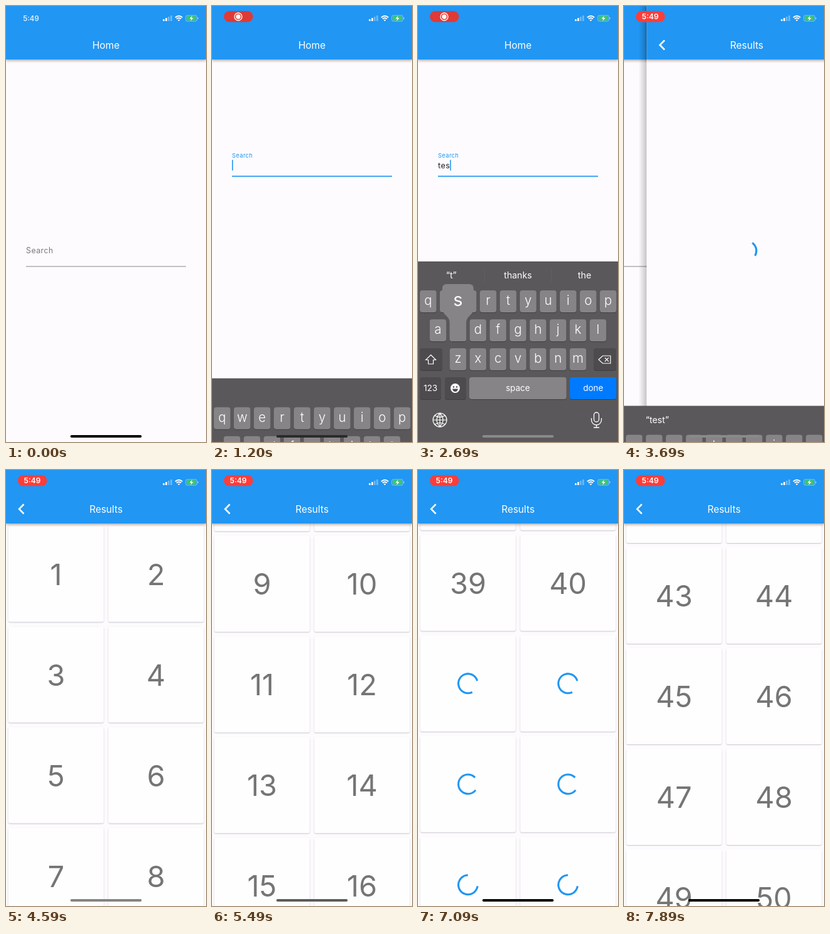
An HTML page with a canvas for the animation above (7990 ms loop, 320x693 px).

```html
<!DOCTYPE html>
<html lang="en">
<head>
<meta charset="utf-8">
<title>Search and results</title>
<style>
html, body { margin: 0; height: 100%; overflow: hidden; background: #fdfbfe; }
canvas { display: block; width: 320px; height: 693px; }
</style>
</head>
<body>
<canvas id="stage"></canvas>
<script>
const W = 320, H = 693, BAR = 85, LOOP = 7990;
const BLUE = '#2196f3', PAGE = '#fdfbfe', KEY = '#868486', DARK_KEY = '#4d4b4d';
const canvas = document.getElementById('stage'), c = canvas.getContext('2d');
const dpr = window.devicePixelRatio || 1;
canvas.width = W * dpr;
canvas.height = H * dpr;

// Timeline in ms
const PILL = 590, FOCUS = 980, KEYBOARD_UP = 1122, PUSH = 3557, KEYBOARD_DOWN = 3526;
const LOADED = 4555, SWIPE_1 = 4990, SWIPE_2 = 5790;
const presses = [['t', 1880], ['e', 2180], ['s', 2580], ['t', 2880]];

const clamp = v => Math.max(0, Math.min(1, v));
const mix = (a, b, u) => a + (b - a) * u;

function bezier(x1, y1, x2, y2) {
  const at = (s, a, b) => 3 * (1 - s) ** 2 * s * a + 3 * (1 - s) * s * s * b + s ** 3;
  return x => {
    if (x <= 0 || x >= 1) return clamp(x);
    let lo = 0, hi = 1;
    for (let i = 0; i < 24; i++) {
      const mid = (lo + hi) / 2;
      if (at(mid, x1, x2) < x) lo = mid; else hi = mid;
    }
    return at(lo, y1, y2);
  };
}
const fastOutSlowIn = bezier(.4, 0, .2, 1);
const pageCurve = bezier(.35, .91, .33, .97);

// Critically damped spring, as used by the keyboard
function spring(ms) {
  const x = Math.max(0, ms) * .01826;
  return 1 - (1 + x) * Math.exp(-x);
}

// Accelerating drag followed by a fling with friction
function swipe(ms, duration, distance) {
  if (ms < 0) return 0;
  if (ms < duration) return distance * (ms / duration) ** 1.8;
  return distance + 900 * distance / duration * (1 - Math.exp(-(ms - duration) / 500));
}
const PAUSE = 742, DRAG = 565, DRAG_PX = 1025.6;
const scrollAt = t => t < SWIPE_2
  ? Math.min(PAUSE, swipe(t - SWIPE_1, 200, 206))
  : PAUSE + swipe(t - SWIPE_2, DRAG, DRAG_PX);

// Time at which a row comes within 250px of the viewport: inverse of the second swipe
function builtAt(row) {
  const x = BAR + 160 * row - H - 250 - PAUSE;
  if (x < DRAG_PX) return SWIPE_2 + DRAG * (x / DRAG_PX) ** (1 / 1.8);
  return SWIPE_2 + DRAG - 500 * Math.log(1 - (x - DRAG_PX) / (900 * DRAG_PX / DRAG));
}
const pageReadyAt = row => row < 10 ? 0 : builtAt(row < 20 ? 10 : 20) + 1000;

function rect(x, y, w, h, r, color) {
  c.fillStyle = color;
  c.beginPath();
  c.roundRect(x, y, w, h, r);
  c.fill();
}

function text(str, x, y, size, { color = '#fff', weight = 400, align = 'center', spacing = 0 } = {}) {
  c.font = `${weight} ${size}px Inter, "Liberation Sans", sans-serif`;
  c.letterSpacing = spacing + 'px';
  c.textAlign = align;
  c.fillStyle = color;
  c.fillText(str, x, y + size * .36);
}

function stroke(path, width, color = '#fff') {
  c.strokeStyle = color;
  c.lineWidth = width;
  c.stroke(new Path2D(path));
}

function disc(x, y, r, color = '#fff') {
  c.fillStyle = color;
  c.beginPath();
  c.arc(x, y, r, 0, 7);
  c.fill();
}

function shadow(color, blur, dy) {
  c.shadowColor = color;
  c.shadowBlur = blur * dpr;
  c.shadowOffsetY = dy * dpr;
}

function layer(x, y, draw) {
  c.save();
  c.translate(x, y);
  draw();
  c.restore();
}

function appBar(title) {
  layer(0, 0, () => {
    shadow('rgba(0,0,0,.32)', 4, 1.5);
    rect(0, 0, W, BAR, 0, BLUE);
  });
  text(title, W / 2, 62, 15.5);
}

function spinner(x, y, ms) {
  const turn = ms / 1000, step = Math.floor(turn) % 5, u = turn % 1;
  const head = fastOutSlowIn(u * 2), tail = fastOutSlowIn(u * 2 - 1);
  const start = Math.PI * (-.5 + 1.5 * tail + 1.7 * u - .8 * step);
  c.strokeStyle = BLUE;
  c.lineWidth = 3.1;
  c.lineCap = 'square';
  c.beginPath();
  c.arc(x, y, 15.4, start, start + Math.max(.001, 1.5 * Math.PI * (head - tail)));
  c.stroke();
  c.lineCap = 'butt';
}

function homePage(t) {
  rect(0, 0, W, H, 0, PAGE);
  appBar('Home');
  const focused = t >= FOCUS && t < KEYBOARD_DOWN;
  const raised = t >= KEYBOARD_UP && t < KEYBOARD_DOWN;
  const float = fastOutSlowIn((t - FOCUS) / 190);
  const typed = presses.filter(p => t >= p[1]);
  const value = typed.map(p => p[0]).join('');
  const accent = focused ? BLUE : '#7a787b';
  layer(32, raised ? -143.5 : 0, () => {
    text('Search', 0, mix(389, 381, float), mix(12.4, 9.4, float),
      { color: accent, align: 'left', spacing: mix(.45, .35, float) });
    text(value, 0, 396.5, 12.6, { color: '#222', align: 'left', spacing: .4 });
    const caret = value ? c.measureText(value).width : 0;
    rect(0, focused ? 413.3 : 413.5, 256, focused ? 1.6 : .9, 0, focused ? BLUE : '#88868a');
    const lastEdit = typed.length ? typed[typed.length - 1][1] : FOCUS;
    if (focused && (t - lastEdit) % 1000 < 500) rect(caret, 388, 1.6, 17, .5, BLUE);
  });
}

function resultsPage(t) {
  rect(0, 0, W, H, 0, PAGE);
  if (t < LOADED) spinner(W / 2, 389, t - PUSH);
  else {
    const scroll = scrollAt(t);
    const first = Math.floor(scroll / 160);
    for (let row = first; row < first + 5; row++) {
      const y = BAR + 80 + row * 160 - scroll;
      for (let col = 0; col < 2; col++) {
        const x = 80 + col * 160;
        layer(0, 0, () => {
          shadow('rgba(60,50,70,.27)', 1.6, 1);
          rect(x - 76.5, y - 76.5, 153, 153, 3, '#fefefe');
        });
        if (t < pageReadyAt(row)) spinner(x, y, t - builtAt(row));
        else text(row * 2 + col + 1, x, y + .6, 47, { color: '#757575' });
      }
    }
  }
  appBar('Results');
  stroke('M28.5 54.5L21 62l7.5 7.5', 2.6);
}

const keyRows = [['qwertyuiop', 3, 452], ['asdfghjkl', 18.7, 498], ['zxcvbnm', 50.7, 544]];

function key(x, y, w, label, size, color = KEY, weight = 400) {
  rect(x, y + 1, w, 35, 4, '#403e40');
  rect(x, y, w, 35, 4, color);
  if (label) text(label, x + w / 2, y + 17.5 - (size > 16 ? 1.5 : 0), size, { weight });
}

function popup(letter) {
  const [row, x0, y] = keyRows.find(r => r[0].includes(letter));
  layer(x0 + row.indexOf(letter) * 32 + 13.2, y, () => {
    c.fillStyle = KEY;
    c.fill(new Path2D('M-18-56H18Q25-56 25-49V-18Q25-11 19-6Q13.2-1 13.2 6V31Q13.2 35 9 35H-9' +
      'Q-13.2 35-13.2 31V6Q-13.2-1-19-6Q-25-11-25-18V-49Q-25-56-18-56Z'));
    text(letter, 0, -31.5, 29);
  });
}

function suggestions(t) {
  if (t >= 2980) return ['“test”'];
  return t >= 1980 ? ['“t”', 'thanks', 'the'] : [];
}

function keyboard(t) {
  rect(0, 406, W, 287, 0, '#5a585a');
  const words = suggestions(t);
  words.forEach((word, i) => text(word, 53.3 + i * 106.6, 428, 14.2));
  if (words.length > 1) [106, 213].forEach(x => rect(x, 416, .7, 24, 0, '#646264'));

  for (const [letters, x, y] of keyRows)
    [...letters].forEach((ch, i) => key(x + i * 32, y, 26.5, ch, 20.5, KEY, 300));
  key(3, 544, 36, '', 0, DARK_KEY);
  key(281, 544, 36, '', 0, DARK_KEY);
  key(3, 590, 34, '123', 13.5, DARK_KEY);
  key(43, 590, 34, '', 0, DARK_KEY);
  key(82, 590, 155.5, 'space', 13.5);
  key(243, 590, 74.5, 'done', 13.5, '#007aff');

  stroke('M20.5 554.5L28.5 562.5H24.5V569H16.5V562.5H12.5Z', 1.2);
  stroke('M289 562L295.5 556H308V568H295.5ZM299 559l6 6m0-6l-6 6', 1.2);
  disc(59.5, 607.5, 7.5);
  disc(57, 605.5, 1.2, DARK_KEY);
  disc(62, 605.5, 1.2, DARK_KEY);
  c.fillStyle = DARK_KEY;
  c.fill(new Path2D('M55 608.5H64Q63 613 59.5 613T55 608.5'));

  stroke('M24 658a11 11 0 1 0 22 0a11 11 0 1 0-22 0H46M35 647V669M35 647q-10 11 0 22q10-11 0-22' +
    'M27 651q8 5 16 0M27 665q8-5 16 0', 1.2);
  stroke('M281.5 650a4 4 0 0 1 8 0v7a4 4 0 0 1-8 0ZM277.5 655v3a8 8 0 0 0 16 0v-3M285.5 666v4M281 670h9', 1.3);

  const pressed = presses.find(p => t >= p[1] && t < p[1] + 150);
  if (pressed) popup(pressed[0]);
}

function statusBar(t) {
  if (t < PILL) text('5:49', 40, 20, 11.5, { weight: 600, color: '#d9edfd' });
  else {
    const showTime = t >= 3380;
    rect(19, 8, 46.5, 17.6, 8.8, showTime ? '#fd3d39' : '#df3a36');
    if (showTime) text('5:49', 42, 17, 12, { weight: 600 });
    else {
      stroke('M36 17a6 6 0 1 0 12 0a6 6 0 1 0-12 0', 1.3);
      disc(42, 17, 3.7);
    }
  }
  for (let i = 0; i < 4; i++)
    rect(251 + i * 4, 21 - i * 2, 2.7, 3 + i * 2, .6, i < 2 ? '#fff' : 'rgba(255,255,255,.35)');
  stroke('M270.8 18.2q5.7-5 11.4 0M272.9 20.6q3.6-3 7.2 0', 1.9);
  c.fillStyle = '#fff';
  c.fill(new Path2D('M274.6 22.2q1.9-1.4 3.8 0l-1.9 2z'));
  c.strokeStyle = 'rgba(255,255,255,.55)';
  c.lineWidth = .8;
  c.beginPath();
  c.roundRect(287.6, 15, 18, 9.2, 2.6);
  c.stroke();
  rect(289, 16.3, 15.2, 6.6, 1.4, '#3ccb5a');
  rect(306.5, 18, 1.2, 3.2, .6, 'rgba(255,255,255,.55)');
  c.fillStyle = '#fff';
  c.fill(new Path2D('M298 15.2l-4.2 5h2.7l-1.3 4 4.4-5.2h-2.8z'));
}

function homeIndicator(t) {
  const lit = t < 3690 ? clamp((t - 1080) / 350) : 1 - clamp((t - 3690) / 2600) ** 3;
  const v = Math.round(138 * lit);
  rect(103, 682, 114, 4, 2, `rgb(${v},${v},${v})`);
}

function draw(t) {
  c.setTransform(dpr, 0, 0, dpr, 0, 0);
  const push = pageCurve((t - PUSH) / 300);
  const x = W * (1 - push);
  if (push < 1) layer(-push * W / 3, 0, () => {
    homePage(t);
    rect(W, 0, W, BAR, 0, BLUE);
  });
  if (push > 0) {
    if (push < 1) {
      const edge = c.createLinearGradient(x - 13, 0, x, 0);
      edge.addColorStop(0, 'rgba(0,0,0,0)');
      edge.addColorStop(1, 'rgba(0,0,0,.22)');
      rect(x - 13, 0, 13, H, 0, edge);
    }
    layer(x, 0, () => resultsPage(t));
  }
  const shown = t < KEYBOARD_DOWN ? spring(t - KEYBOARD_UP) : 1 - spring(t - KEYBOARD_DOWN);
  if (shown > .002) layer(0, 287 * (1 - shown), () => keyboard(t));
  statusBar(t);
  homeIndicator(t);
}

const began = performance.now();
function tick() {
  const t = (performance.now() - began) % LOOP;
  draw(Math.floor((t + 10) / 100) * 100 - 10);
  requestAnimationFrame(tick);
}
tick();
</script>
</body>
</html>
```
